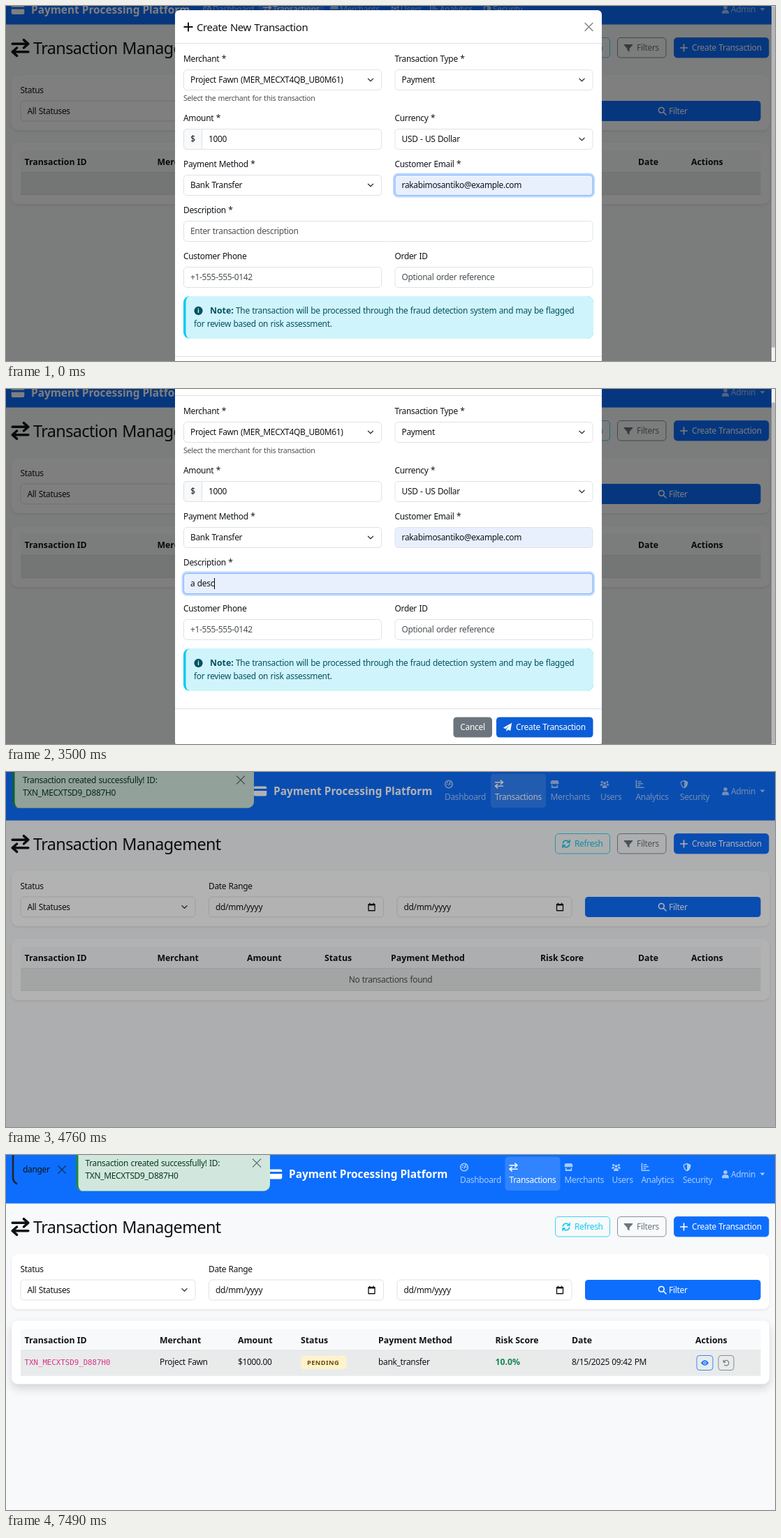
An HTML page with a canvas that plays this animation: 1101x509 px, repeating every 8000 ms.

```html
<!DOCTYPE html>
<html lang="en">
<head>
<meta charset="utf-8">
<title>Create transaction</title>
<style>
  html, body { margin: 0; width: 100%; height: 100%; overflow: hidden; background: #f8f9fa; }
  canvas { display: block; width: 1101px; height: 509px; }
</style>
</head>
<body>
<canvas id="stage"></canvas>
<script>
const W = 1101, H = 509, LOOP = 8000, STEP = 70, BODY = 12.3;
const INK = '#101316', MUTED = '#4b4f53', LINE = '#dee2e6', BLUE = '#0d6efd', GREY = '#6c757d', CYAN = '#0dcaf0';
const NAV_TEXT = 'rgba(255,255,255,.64)';
const MERCHANT = 'Project Fawn', TXN = 'TXN_MECXTSD9_D887H0';

const dpr = window.devicePixelRatio || 1;
const setUp = canvas => {
  canvas.width = Math.round(W * dpr);
  canvas.height = Math.round(H * dpr);
  const c = canvas.getContext('2d');
  c.scale(dpr, dpr);
  return c;
};
const stage = setUp(document.getElementById('stage'));
const layer = setUp(document.createElement('canvas'));
let g = stage;

// Icons on a 16 x 16 grid: s = stroked path, w = stroke width, f = filled path
const ICONS = {
  plus: { s: 'M8 2V14M2 8H14', w: 2 },
  close: { s: 'M2 2L14 14M14 2L2 14', w: 1.5 },
  chevron: { s: 'M2 5L8 11L14 5', w: 2.2 },
  swap: { s: 'M1 4.5H15M11 1L15 4.5L11 8M15 11.5H1M5 8L1 11.5L5 15', w: 2.1 },
  card: { f: 'M0 4Q0 2 2 2H14Q16 2 16 4V5H0ZM0 7.5H16V12Q16 14 14 14H2Q0 14 0 12Z' },
  gauge: { s: 'M8 1.2A6.8 6.8 0 1 1 7.9 1.2ZM8 10L10.5 4M4 8H5M11.5 8H12M5.5 4.5L6 5', w: 2 },
  store: { f: 'M2 1H14L16 6Q14 9 12 7Q10 9 8 7Q6 9 4 7Q2 9 0 6ZM2 9H4V12H12V9H14V15H2Z' },
  users: { f: 'M5.5 6A2.5 2.5 0 1 1 10.5 6A2.5 2.5 0 1 1 5.5 6ZM3.5 15Q3.5 9.5 8 9.5Q12.5 9.5 12.5 15ZM1 4A2 2 0 1 1 5 4A2 2 0 1 1 1 4ZM11 4A2 2 0 1 1 15 4A2 2 0 1 1 11 4ZM0 10Q0 7 4 7L5 9L3 11H0ZM16 10Q16 7 12 7L11 9L13 11H16Z' },
  chart: { s: 'M1.5 1V14H15M5 3.5H10M5 7H13M5 10.5H8', w: 2 },
  shield: { s: 'M8 1.5L14 4Q14 11.5 8 14.7Q2 11.5 2 4Z', w: 1.8, f: 'M8 1.5L14 4Q14 11.5 8 14.7Z' },
  user: { f: 'M4.2 4A3.8 3.8 0 1 1 11.8 4A3.8 3.8 0 1 1 4.2 4ZM1 16Q1 9 6 9H10Q15 9 15 16Z' },
  refresh: { s: 'M2 7A6.2 6.2 0 0 1 13.5 5M14 9A6.2 6.2 0 0 1 2.5 11M14.5 1V5.5H10M1.5 15V10.5H6', w: 1.9 },
  funnel: { f: 'M0 1.5H16V3L10 9.5V15L6 12.5V9.5L0 3Z' },
  search: { s: 'M1.5 6.5A5 5 0 1 1 11.5 6.5A5 5 0 1 1 1.5 6.5ZM10 10L15 15', w: 2 },
  plane: { f: 'M16 0L13.5 14.5L8.5 12.4L6 16V11.3L13 3.5L4.5 10.8L0 9Z' },
  info: { f: 'M0 8A8 8 0 1 1 16 8A8 8 0 1 1 0 8Z' },
  eye: { f: 'M0 8Q8 -3 16 8Q8 19 0 8Z' },
  undo: { s: 'M2 2V6.5H6.5M2.5 6.5A6 6 0 1 1 4 12.5', w: 1.8 },
  calendar: { s: 'M2 3H14V15H2ZM2 4.5H14M4.5 1V3M11.5 1V3', w: 1.8 }
};

const ramp = (t, from, dur) => Math.min(1, Math.max(0, (t - from) / dur));
const easeInOut = p => p < .5 ? 2 * p * p : 1 - 2 * (1 - p) * (1 - p);
const easeOut = p => 1 - Math.pow(1 - p, 1.6);
const mix = (a, b, p) => `rgb(${a.map((v, i) => Math.round(v + (b[i] - v) * p))})`;

function text(s, x, y, { size = BODY, color = INK, bold = false, align = 'left', mono = false, track } = {}) {
  const plain = !bold && !mono, px = plain ? size * .97 : size;
  const family = mono ? '"DejaVu Sans Mono", monospace' : '"Noto Sans", sans-serif';
  g.font = `${bold ? 700 : 400} ${px}px ${family}`;
  g.letterSpacing = `${track ?? (plain ? -.025 * px : 0)}px`;
  g.wordSpacing = `${plain ? .05 * px : 0}px`;
  g.textAlign = align;
  g.fillStyle = color;
  g.fillText(s, x, y + size * .36);
}

function box(x, y, w, h, { r = 4.6, fill, stroke, lw = .8 } = {}) {
  g.beginPath();
  g.roundRect(x, y, w, h, r);
  if (fill) { g.fillStyle = fill; g.fill(); }
  if (stroke) { g.strokeStyle = stroke; g.lineWidth = lw; g.stroke(); }
}

// Rounded panel whose coloured left border follows its corners
function panel(x, y, w, h, fill, accent) {
  const r = 9, edge = 3.5, inner = { x: r - edge, y: r };
  box(x, y, w, h, { r, fill: accent });
  box(x + edge, y, w - edge, h, { r: [inner, r, r, inner], fill });
}

function icon(name, cx, cy, size, color) {
  const { s, w, f } = ICONS[name];
  g.save();
  g.translate(cx - size / 2, cy - size / 2);
  g.scale(size / 16, size / 16);
  g.fillStyle = g.strokeStyle = color;
  g.lineWidth = w || 1;
  g.lineCap = g.lineJoin = 'round';
  if (f) g.fill(new Path2D(f));
  if (s) g.stroke(new Path2D(s));
  g.restore();
}

function rule(x1, x2, y, color = LINE) {
  g.fillStyle = color;
  g.fillRect(x1, y, x2 - x1, 1);
}

function card(y, h, lift = 0) {
  g.save();
  g.shadowColor = `rgba(0,0,0,${.085 + .07 * lift})`;
  g.shadowOffsetY = (1.5 + 4.5 * lift) * dpr;
  g.shadowBlur = (3.5 + 9 * lift) * dpr;
  box(8, y, 1085, h, { r: 9, fill: '#fff' });
  g.restore();
}

// Navigation bar: label, icon and x positions for no alert, one alert, two alerts
const NAV = [
  ['Dashboard', 'gauge', 296, 628, 650],
  ['Transactions', 'swap', 382, 700, 720.5],
  ['Merchants', 'store', 478, 779.5, 799.5],
  ['Users', 'users', 565, 851, 867.5],
  ['Analytics', 'chart', 621, 901.5, 909.5],
  ['Security', 'shield', 697, 965, 969]
];

function navbar(alerts) {
  const inline = alerts === 0;
  g.fillStyle = BLUE;
  g.fillRect(0, 0, W, inline ? 26.5 : 69.5);
  const mid = inline ? 5 : 27.5;
  const brand = [36, 383, 405][alerts];
  icon('card', brand - 19, mid, 18.5, '#fff');
  text('Payment Processing Platform', brand, mid, { size: 15.4, bold: true, color: '#fff' });
  NAV.forEach(([label, name, ...xs], i) => {
    const x = xs[alerts], color = i === 1 ? '#fff' : NAV_TEXT;
    if (i === 1) {
      if (inline) box(x - 21, -10, 94, 30, { fill: 'rgba(255,255,255,.15)' });
      else box(x - 6, 2.5, 79, 48.5, { fill: 'rgba(255,255,255,.15)' });
    }
    icon(name, inline ? x - 8 : x + 6, inline ? mid : 17.5, 12.5, color);
    text(label, x, inline ? mid : 36, { color });
  });
  icon('user', 1030, mid, 11.5, NAV_TEXT);
  text('Admin', 1038, mid, { color: NAV_TEXT });
  g.fillStyle = NAV_TEXT;
  g.beginPath();
  g.moveTo(1079.5, mid - 2);
  g.lineTo(1086.5, mid - 2);
  g.lineTo(1083, mid + 2);
  g.fill();
}

function alertBoxes(t, alerts) {
  if (!alerts) return;
  const x = alerts === 2 ? 100 : 9, right = alerts === 2 ? 378 : 355;
  const shown = ramp(t, 4240, 300);
  g.save();
  g.globalAlpha = shown;
  g.translate(0, -20 * (1 - easeOut(shown)));
  box(x + .5, -20, right - x - 1, 71.5, { r: 9, stroke: '#a3cfbb' });
  panel(x, -20, right - x, 71.5, '#d1e7dd', '#198754');
  const tx = alerts === 2 ? 113.5 : 24;
  text('Transaction created successfully! ID:', tx, 12, { color: '#0a3622' });
  text(TXN, tx, 30, { color: '#0a3622' });
  icon('close', right - 19, 11.5, 15, '#62706a');
  g.restore();

  if (alerts < 2) return;
  g.save();
  g.globalAlpha = ramp(t, 4870, 170);
  g.strokeStyle = '#212529';
  g.lineWidth = 2.6;
  g.beginPath();
  g.moveTo(10, -2);
  g.lineTo(10, 33);
  g.quadraticCurveTo(10.5, 39, 16, 41.5);
  g.stroke();
  text('danger', 24, 21);
  icon('close', 80, 21, 14, '#12305f');
  g.restore();
}

function field(x, y, w, s, { placeholder, select, fill = '#fff' } = {}) {
  box(x + .5, y - 14.5, w - 1, 29, { fill, stroke: LINE, lw: 1 });
  text(s, x + 10, y, { color: placeholder ? MUTED : INK });
  if (select) icon('chevron', x + w - 16, y, 9.5, '#343a40');
}

function toolButton(x, w, name, label, color, solid) {
  box(x + .5, 88.5, w - 1, 28.5, { fill: solid && color, stroke: color });
  const ink = solid ? '#fff' : color;
  icon(name, x + (solid ? 14.5 : 16), 103, solid ? 13 : 12.5, ink);
  text(label, x + (solid ? 26 : 28), 103, { color: ink });
}

const HEADS = ['Transaction ID', 'Merchant', 'Amount', 'Status', 'Payment Method', 'Risk Score', 'Date', 'Actions'];
const EMPTY_X = [26.5, 216.5, 345, 456, 551, 765, 905, 981];
const FILLED_X = [26.5, 220, 332, 422, 533, 700.5, 810, 987];

function table(filled, lift) {
  const xs = filled ? FILLED_X : EMPTY_X, rowEnd = filled ? 317 : 313;
  g.save();
  g.translate(0, -1.5 * lift);
  card(239, filled ? 91 : 88, lift);
  g.fillStyle = '#f8f9fa';
  g.fillRect(21, 251, 1059.5, 30);
  g.fillStyle = '#e9ebeb';
  g.fillRect(21, 281.5, 1059.5, rowEnd - 281.5);
  rule(21, 1080.5, 281);
  rule(21, 1080.5, rowEnd);
  HEADS.forEach((h, i) => text(h, xs[i], 267, { bold: true }));
  if (!filled) {
    text('No transactions found', 550.5, 298, { color: MUTED, align: 'center' });
  } else {
    text(TXN, xs[0], 298.5, { mono: true, size: 10.75, color: '#d63384' });
    text(MERCHANT, xs[1], 298);
    text('$1000.00', xs[2], 298);
    box(422.5, 289.5, 65, 19, { fill: '#fff3cd' });
    text('PENDING', 431, 299, { size: 9.3, bold: true, color: '#664d03', track: .4 });
    text('bank_transfer', xs[4], 298);
    text('10.0%', xs[5], 298, { bold: true, color: '#198754' });
    text('8/15/2025 09:42 PM', xs[6], 298);
    box(989, 289, 23, 21, { r: 4, stroke: BLUE });
    icon('eye', 1000.5, 299.5, 11, BLUE);
    g.fillStyle = '#e9ebeb';
    g.beginPath();
    g.arc(1000.5, 299.5, 2.3, 0, 7);
    g.fill();
    g.fillStyle = BLUE;
    g.beginPath();
    g.arc(1000.5, 299.5, 1.2, 0, 7);
    g.fill();
    box(1020, 289, 22, 21, { r: 4, stroke: GREY });
    icon('undo', 1031, 299.5, 10, GREY);
  }
  g.restore();
}

function page(t, alerts) {
  g.fillStyle = '#f8f9fa';
  g.fillRect(0, 0, W, H);
  navbar(alerts);
  g.save();
  if (!alerts) g.translate(0, -43);
  icon('swap', 20.5, 103, 26, INK);
  text('Transaction Management', 39, 103.5, { size: 24.1 });
  toolButton(786, 79, 'refresh', 'Refresh', CYAN);
  toolButton(875, 70.5, 'funnel', 'Filters', GREY);
  toolButton(956, 136.5, 'plus', 'Create Transaction', BLUE, true);
  card(142, 79);
  text('Status', 20.5, 164);
  text('Date Range', 290, 164);
  field(20.5, 193.5, 251, 'All Statuses', { select: true });
  for (const x of [290, 559.5]) {
    field(x, 193.5, 251, 'dd/mm/yyyy');
    icon('calendar', x + 233.5, 193.5, 12, INK);
  }
  box(829, 179, 251.5, 29, { fill: BLUE });
  icon('search', 939.5, 193.5, 12.5, '#fff');
  text('Filter', 949, 194, { color: '#fff' });
  table(alerts === 2, ramp(t, 7180, 300));
  g.restore();
  alertBoxes(t, alerts);
}

function focusRing(x, y, w, p) {
  if (p <= 0) return;
  g.save();
  g.globalAlpha = p;
  box(x - 1, y - 16, w + 2, 32, { r: 6, stroke: 'rgba(13,110,253,.27)', lw: 3 });
  box(x + .5, y - 14.5, w - 1, 29, { stroke: '#86b7fe', lw: 1 });
  g.restore();
}

function modal(t, reset) {
  const L = 254, R = 556.5, COL = 284, WIDE = 586.5, AUTO = '#e8f0fe';
  box(242, 6, 611, 550, { r: 6, fill: '#fff' });
  icon('plus', 261, 30, 15.5, INK);
  text('Create New Transaction', 273, 30.5, { size: 15.4 });
  icon('close', 834.5, 30, 14.5, '#7c7f82');
  rule(242, 853, 53);

  const labels = [[76, 'Merchant *', 'Transaction Type *'], [161, 'Amount *', 'Currency *'],
    [227, 'Payment Method *', 'Customer Email *'], [293, 'Description *', ''], [359, 'Customer Phone', 'Order ID']];
  for (const [y, left, right] of labels) {
    text(left, L, y);
    text(right, R, y);
  }
  field(L, 106, COL, reset ? 'Select Merchant' : `${MERCHANT} (MER_MECXT4QB_UB0M61)`, { select: true });
  field(R, 106, COL, 'Payment', { select: true });
  text('Select the merchant for this transaction', L, 132, { size: 10.95, color: MUTED });

  field(L, 191, COL, '');
  box(L + .5, 176.5, 26, 29, { r: [4.6, 0, 0, 4.6], fill: '#f8f9fa', stroke: LINE, lw: 1 });
  text('$', 267.5, 191, { align: 'center' });
  if (!reset) text('1000', 290, 191);
  field(R, 191, COL, 'USD - US Dollar', { select: true });

  field(L, 257, COL, reset ? 'Credit Card' : 'Bank Transfer', { select: true });
  field(R, 257, COL, reset ? '' : 'rakabimosantiko@example.com', { fill: reset ? '#fff' : AUTO });
  focusRing(R, 257, COL, 1 - ramp(t, 180, 200));

  const filled = reset ? 0 : ramp(t, 735, 105);
  if (filled > 0) field(L, 323, WIDE, 'a desc', { fill: mix([255, 255, 255], [232, 240, 254], filled) });
  else field(L, 323, WIDE, 'Enter transaction description', { placeholder: true });
  focusRing(L, 323, WIDE, ramp(t, 180, 200) * (1 - ramp(t, 3750, 200)));
  const within = (a, b) => t >= a && t < b;
  g.fillStyle = '#000';
  if (within(210, 770)) g.fillRect(264, 315, 1, 16);
  if (within(1260, 1820) || within(2310, 2870) || within(3360, 3780)) g.fillRect(298, 315, 1, 16);

  field(L, 389, COL, '+1-555-555-0142', { placeholder: true });
  field(R, 389, COL, 'Optional order reference', { placeholder: true });

  panel(L, 416, 587, 61, '#cff4fc', CYAN);
  const teal = { color: '#055160' };
  icon('info', 275.5, 437, 12.3, '#055160');
  text('i', 275.5, 437, { size: 9.5, bold: true, color: '#cff4fc', align: 'center' });
  text('Note:', 292, 437, { bold: true, ...teal });
  text('The transaction will be processed through the fraud detection system and may be flagged', 329, 437, teal);
  text('for review based on risk assessment.', 269, 455.5, teal);

  rule(242, 853, 502);
  box(640.5, 514.5, 55.5, 29, { fill: GREY });
  text('Cancel', 668, 529, { color: '#fff', align: 'center' });
  const hover = ramp(t, 3330, 170) * (1 - ramp(t, 4300, 150));
  box(702, 514.5, 138.5, 29, { fill: within(3780, 3990) ? '#0a58ca' : mix([13, 110, 253], [11, 94, 215], hover) });
  icon('plane', 718, 529, 12.3, '#fff');
  text('Create Transaction', 730, 529, { color: '#fff' });
}

function draw(t) {
  const alerts = t < 4270 ? 0 : t < 4900 ? 1 : 2;
  g = stage;
  page(t, alerts);

  const dim = .5 * (1 - ramp(t, 4700, 150));
  g.fillStyle = `rgba(0,0,0,${dim})`;
  g.fillRect(0, 0, W, H);

  const opacity = 1 - ramp(t, 4514, 150);
  if (opacity <= 0) return;
  const scroll = easeInOut(ramp(t, 2040, 270));
  g = layer;
  g.clearRect(0, 0, W, H);
  g.save();
  g.translate(0, -44 * scroll - 38.5 * easeOut(ramp(t, 4514, 300)));
  modal(t, alerts > 0);
  g.restore();
  g.fillStyle = '#f1f1f1';
  g.fillRect(1096, 0, 5, H);
  box(1096, 19 * scroll, 5, 490, { r: 2.5, fill: '#b4b6b8' });
  g = stage;
  g.globalAlpha = opacity;
  g.drawImage(layer.canvas, 0, 0, W, H);
  g.globalAlpha = 1;
}

const start = performance.now();
function tick() {
  const t = (performance.now() - start) % LOOP;
  draw(Math.floor(t / STEP) * STEP);
  requestAnimationFrame(tick);
}
tick();
</script>
</body>
</html>
```
